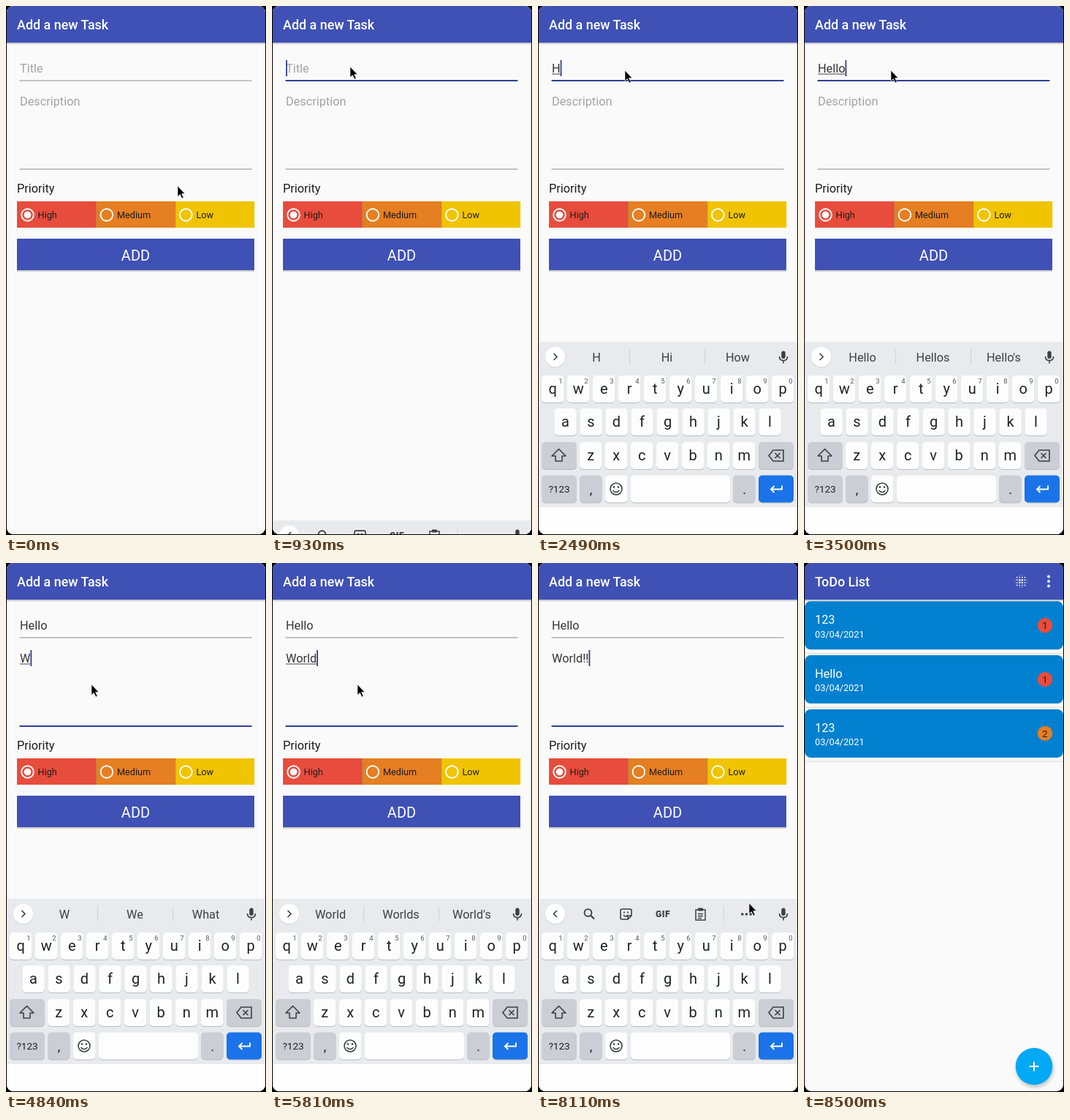
An HTML page for the animation above (9090 ms loop, 356 by 723 pixels).

```html
<!DOCTYPE html>
<html lang="en">
<head>
<meta charset="utf-8">
<title>Add a new Task</title>
<style>
  html, body { margin: 0; width: 100%; height: 100%; overflow: hidden; background: #000; }
  svg { display: block; width: 356px; height: 723px; font-family: Roboto, sans-serif; }
</style>
</head>
<body>
<svg id="stage" viewBox="0 0 356 723"></svg>
<script>
const LOOP = 9090;
const INDIGO = '#3f51b5', ACCENT = '#2f3f92', INK = '#3c4043';

const REFRESHES = [
  [0, 0, 1], [120, 1050, 8], [1200, 1350, 2], [1780, 1780, 1], [2370, 2490, 2],
  [2770, 3190, 4], [3500, 4040, 5], [4410, 4410, 1], [4690, 5260, 5],
  [5540, 5810, 3], [6120, 6120, 1], [6400, 7420, 9], [7570, 8500, 8],
].flatMap(([a, b, n]) => Array.from({ length: n }, (_, i) => a + (b - a) * i / (n - 1 || 1)));

const POINTER = [
  [0, 235, 246], [120, 230, 240], [800, 107, 83], [1200, 107, 83], [1350, 119, 88],
  [3500, 119, 88], [3780, 117, 166], [6400, 117, 166], [6900, 168, 354],
  [7050, 168, 354], [7420, 289, 465], [8110, 289, 465], [8370, 360, 570],
];
const KEYBOARD = [[900, 264], [1050, 90], [1190, 0], [8120, 0], [8370, 264]];
const FORM = [[8120, 0, 1], [8370, 24, 0.15], [8490, 40, 0]];
const CARET_OFF = [[1780, 2370], [3640, 3900], [4410, 4690], [6780, 7300], [7690, 8090]];

const SUGGESTIONS = {
  H: ['H', 'Hi', 'How'], He: ['He', 'Hello', 'Hey'], Hel: ['Hel', 'Hello', 'Help'],
  Hell: ['Hell', 'Hello', 'Hells'], Hello: ['Hello', 'Hellos', "Hello's"],
  W: ['W', 'We', 'What'], Wo: ['Wo', 'Would', 'Work'], Wor: ['Wor', 'Work', 'World'],
  Worl: ['Worl', 'World', 'Worlds'], World: ['World', 'Worlds', "World's"],
};

const rect = (x, y, w, h, fill, rx = 0, more = '') =>
  `<rect x="${x}" y="${y}" width="${w}" height="${h}" rx="${rx}" fill="${fill}" ${more}/>`;
const circle = (x, y, r, fill, more = '') => `<circle cx="${x}" cy="${y}" r="${r}" fill="${fill}" ${more}/>`;
const text = (x, y, size, fill, str, more = '') =>
  `<text x="${x}" y="${y}" font-size="${size}" fill="${fill}" ${more}>${str}</text>`;
const centered = (x, y, size, fill, str, more = '') => text(x, y, size, fill, str, `text-anchor="middle" ${more}`);
const line = (d, color = INK, width = 1.6, more = '') =>
  `<path d="${d}" fill="none" stroke="${color}" stroke-width="${width}" ${more}/>`;

const appBar = title => rect(0, 50, 356, 3, 'url(#shade)') + rect(0, 0, 356, 50, INDIGO) +
  text(15, 32, 17.9, '#fff', title, 'font-weight="500"');

function formScreen() {
  const choices = [['High', '#e74c3c'], ['Medium', '#e67e22'], ['Low', '#f0c400']].map(([label, color], i) => {
    const x = 15 + i * 108.4;
    return rect(x, 267, 108.4, 36, color) + (i ? rect(x - 0.5, 267, 1, 36, '#0003') : '') +
      circle(x + 14.5, 285.5, 8.3, 'none', 'stroke="#fff" stroke-width="1.9"') +
      (i ? '' : circle(x + 14.5, 285.5, 4.8, '#fff')) + text(x + 28.6, 290, 12.7, '#1c1c1c', label);
  }).join('');
  const field = (name, hint, y) => `<g id="${name}">` + text(19, y, 16.3, '#a3a3a3', hint, 'class="hint"') +
    text(19, y, 16.3, '#363636', '', 'class="value"') + rect(19, y + 1.5, 0, 1, '#444', 0, 'class="composing"') +
    rect(19, y - 17, 1.8, 22, ACCENT, 0, 'class="caret"') + rect(18.5, 0, 318, 1, '#8c8c8c', 0, 'class="rule"') + '</g>';
  return rect(0, 0, 356, 723, '#fafafa') + appBar('Add a new Task') +
    field('title', 'Title', 91) + field('desc', 'Description', 136) +
    text(15, 255, 16.3, '#1c1c1c', 'Priority') + choices +
    rect(15, 361, 325, 3, 'url(#shade)') + rect(15, 318, 325, 43, INDIGO) + centered(177.5, 347.5, 20, '#fff', 'ADD');
}

function listScreen() {
  const tasks = [['123', 1, '#e74c3c'], ['Hello', 1, '#e74c3c'], ['123', 2, '#e67e22']].map(([name, level, color], i) =>
    `<g transform="translate(0 ${i * 73.8})">` + rect(1, 52.3, 354, 66, '#0080ce', 8) + rect(0, 123, 356, 1, '#dadada') +
    text(15, 83, 16.3, '#fff', name) + text(15, 101.5, 12.7, '#fff', '03/04/2021') +
    circle(330, 85.3, 10.2, color) + centered(330, 90, 13, '#1c1c1c', level) + '</g>').join('');
  const spots = [-9, -6, -2, 2, 6, 9];
  const dots = spots.flatMap(x => spots.map(y => {
    const far = Math.max(Math.abs(x), Math.abs(y)), near = Math.min(Math.abs(x), Math.abs(y));
    if (far === 9 && near > 2) return '';
    return circle(297 + x * 0.9, 25 + y * 0.9, far === 2 ? 1.3 : far === 6 ? 0.9 : 0.5, '#fff');
  })).join('');
  return rect(0, 0, 356, 723, '#fafafa') + appBar('ToDo List') + dots +
    [18.5, 25, 31.5].map(y => circle(335, y, 1.9, '#fff')).join('') + tasks +
    circle(316, 691, 26, '#0003', 'filter="url(#soft)"') + circle(315, 688, 25.3, '#03a9f4') +
    line('M308.5 688h13M315 681.5v13', '#fff', 1.9);
}

function keyboard() {
  const key = (x, y, w, fill) => rect(x, y + 1, w, 37, '#b8bbc1', 5) + rect(x, y, w, 37, fill, 5);
  const WHITE = '#fdfdfd', GRAY = '#cbced4';
  const letters = [['qwertyuiop', 5, 505], ['asdfghjkl', 22.3, 550], ['zxcvbnm', 57, 596]].map(([row, left, y], r) =>
    [...row].map((c, i) => {
      const x = left + i * 35;
      return key(x, y, 30.5, WHITE) + centered(x + 15.2, y + 24.5, 20, '#202124', c) +
        (r ? '' : centered(x + 26, y + 10.5, 9.5, '#55585d', (i + 1) % 10));
    }).join('')).join('');
  const special = key(5, 596, 48, GRAY) + key(302, 596, 48, GRAY) + key(5, 641.5, 48, GRAY) + key(57, 641.5, 30.5, GRAY) +
    key(92, 641.5, 30.5, WHITE) + key(127, 641.5, 136, WHITE) + key(267, 641.5, 30.5, GRAY) + key(302, 641.5, 48, '#1a73e8') +
    centered(29, 665, 13.5, '#202124', '?123') + centered(72.5, 667, 18, '#202124', ',') + centered(282.5, 667, 18, '#202124', '.') +
    line('M28.5 605.5l-9.5 9.5h5v7h9v-7h5z', INK, 1.6, 'stroke-linejoin="round"') +
    line('M322 607h14v15h-14l-6-7.5zM324.5 611l7 7m0-7l-7 7', INK) +
    circle(107, 660, 8, 'none', `stroke="${INK}" stroke-width="1.6"`) +
    circle(104, 657.5, 1.3, INK) + circle(110, 657.5, 1.3, INK) + line('M102.5 662q4.5 5 9 0') +
    line('M334 655.5v5h-15m4.5-4.5l-4.5 4.5 4.5 4.5', '#fff', 1.9);
  const tools = '<g id="tools">' + line('M26 475l-4.5 4.5 4.5 4.5') +
    circle(68.5, 478, 4.9, 'none', `stroke="${INK}" stroke-width="1.9"`) + line('M72 481.5l5 5', INK, 2.2) +
    line('M115 473h11q2 0 2 2v7l-5 5h-8q-2 0-2-2v-10q0-2 2-2zM128 482h-5v5M117 481q3 4 6 0', INK) +
    circle(118, 477.5, 1.1, INK) + circle(123, 477.5, 1.1, INK) +
    centered(171, 484, 12, INK, 'GIF', 'font-weight="900" letter-spacing=".6"') +
    line('M216 474h13v14h-13zM219 479.5h7m-7 3h7m-7 3h5', INK, 1.5) + rect(219, 471.5, 7, 4, INK, 1) +
    rect(253.5, 469, 1, 21, '#cfd2d6') + [279.8, 285.5, 291.2].map(x => circle(x, 480, 1.8, INK)).join('') + '</g>';
  const words = '<g id="words">' + line('M21.5 475l4.5 4.5-4.5 4.5') +
    [125, 228].map(x => rect(x, 469, 1, 21, '#cfd2d6')).join('') +
    [80, 176.5, 273.5].map(x => centered(x, 486, 16.3, INK, '')).join('') + '</g>';
  return rect(0, 459, 356, 227, '#e8eaed') + rect(0, 685, 356, 38, '#fefefe') +
    circle(23.5, 480.5, 14, '#0001') + circle(23.5, 479.5, 13.6, '#fff') + tools + words +
    rect(333.3, 471.5, 5.4, 10.5, INK, 2.7) + line('M330.5 479q0 5.5 5.5 5.5t5.5-5.5M336 484.5v4') + letters + special;
}

const stage = document.getElementById('stage');
stage.innerHTML = `<defs>
    <clipPath id="screen"><rect x="1" width="354" height="722" rx="9"/></clipPath>
    <linearGradient id="shade" x2="0" y2="1"><stop stop-opacity=".28"/><stop offset="1" stop-opacity="0"/></linearGradient>
    <filter id="soft"><feGaussianBlur stdDeviation="2"/></filter>
  </defs>
  <g clip-path="url(#screen)">
    <g id="list">${listScreen()}</g><g id="form">${formScreen()}</g><g id="keys">${keyboard()}</g>
  </g>
  <path id="pointer" d="M0 0V14.5L3.3 11.5L6 17L8.2 16L5.6 10.6H10Z" stroke="#fff" stroke-width=".6"/>`;

const $ = id => document.getElementById(id);
const show = (el, on) => el.setAttribute('visibility', on ? 'visible' : 'hidden');

// Linear interpolation through [time, ...values] points
function track(points, t) {
  const i = points.findIndex(p => p[0] > t);
  if (i === 0) return points[0].slice(1);
  if (i < 0) return points[points.length - 1].slice(1);
  const a = points[i - 1], b = points[i], k = (t - a[0]) / (b[0] - a[0]);
  return a.slice(1).map((v, n) => v + (b[n + 1] - v) * k);
}
const typed = (word, times, t) => word.slice(0, times.filter(x => x <= t).length);

function drawField(name, ruleY, value, focused, composing, caretOn) {
  const part = c => $(name).querySelector('.' + c);
  part('value').textContent = value;
  const width = value ? part('value').getComputedTextLength() : 0;
  show(part('hint'), !value);
  show(part('composing'), composing);
  part('composing').setAttribute('width', width);
  show(part('caret'), focused && caretOn);
  part('caret').setAttribute('x', 19 + width);
  part('rule').setAttribute('y', focused ? ruleY - 0.5 : ruleY);
  part('rule').setAttribute('height', focused ? 2 : 1);
  part('rule').setAttribute('fill', focused ? ACCENT : '#8c8c8c');
}

function draw(now) {
  const time = now % LOOP;
  const t = REFRESHES.filter(r => r <= time).pop();

  const title = typed('Hello', [2370, 2770, 2905, 3045, 3185], t);
  const desc = typed('World!!', [4800, 4950, 5250, 5530, 5800, 6120, 6400], t);
  const onTitle = t >= 900 && t < 3900, onDesc = t >= 3900;
  const caretOn = !CARET_OFF.some(([a, b]) => t >= a && t < b);
  drawField('title', 101.5, title, onTitle, onTitle && title, caretOn);
  drawField('desc', 222.5, desc, onDesc, desc && t < 6400, caretOn);

  const suggesting = (t >= 2490 && t < 3900) || (t >= 4800 && t < 6500);
  show($('tools'), !suggesting);
  show($('words'), suggesting);
  const options = SUGGESTIONS[(desc || title).replace(/!/g, '')];
  if (options) $('words').querySelectorAll('text').forEach((el, i) => el.textContent = options[i]);

  $('keys').setAttribute('transform', `translate(0 ${track(KEYBOARD, t)[0]})`);
  const [drop, opacity] = track(FORM, t);
  $('form').setAttribute('transform', `translate(0 ${drop})`);
  $('form').setAttribute('opacity', opacity);
  $('pointer').setAttribute('transform', `translate(${track(POINTER, t)})`);
  show($('pointer'), t < 8490);
}

const start = performance.now();
(function frame() {
  draw(performance.now() - start);
  requestAnimationFrame(frame);
})();
</script>
</body>
</html>
```
